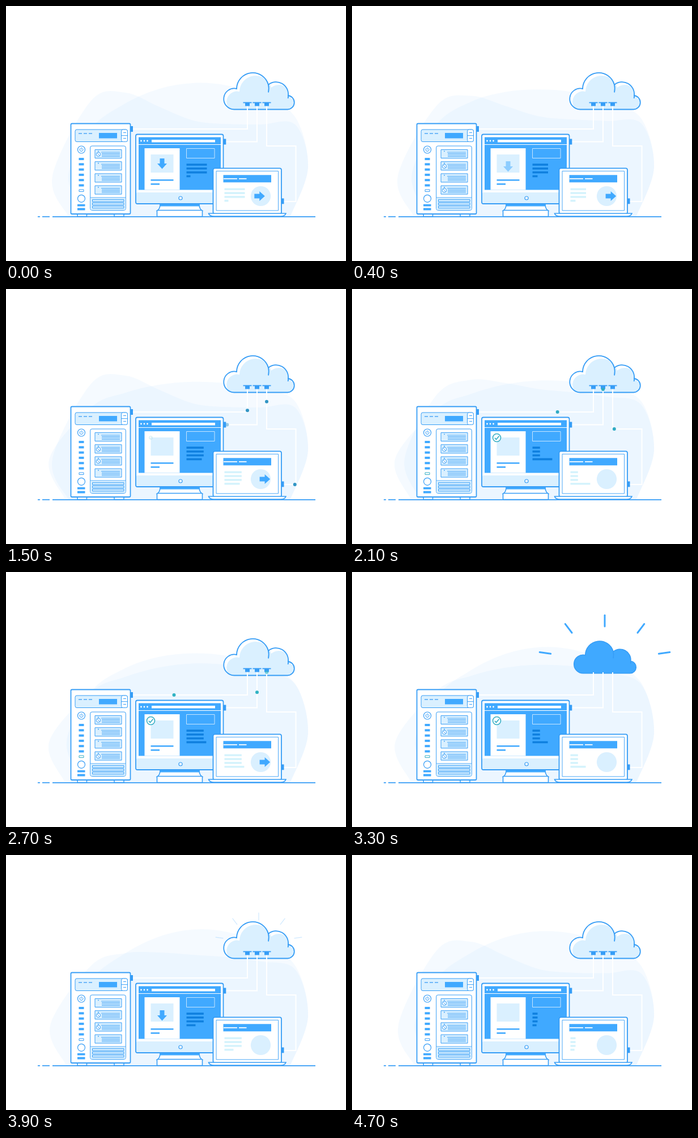
Animation, 600 px wide and 450 px high, one loop 4800 ms. Source, as an HTML page with a canvas:

```html
<!DOCTYPE html>
<html lang="en">
<head>
<meta charset="utf-8">
<title>Cloud backup</title>
<style>
html, body { margin: 0; width: 100%; height: 100%; overflow: hidden; background: #fff; }
canvas { display: block; }
</style>
</head>
<body>
<canvas id="stage" width="600" height="450"></canvas>
<script>
const g = document.getElementById('stage').getContext('2d');
const LOOP = 4800, STEP = 100, SPEED = .58, EDGE = 1.8;
const BLUE = '#40a9ff', LINE = '#369df6', PALE = '#daf0ff', DARK = '#0f80df', TEAL = '#35aec4', WHITE = '#fff';

const CABLES = [
  { pts: [[224, 217], [426, 217], [426, 177]], start: 1147, gap: 714, count: 3 },
  { pts: [[388, 239.5], [443, 239.5], [443, 177]], start: 1496, gap: 354, count: 4 },
  { pts: [[490, 345], [511.5, 345], [511.5, 247], [460, 247], [460, 177]], start: 778, gap: 344, count: 5 }
];
const CLOUD = new Path2D('M403 182.5A18.5 18.5 0 1 1 407 146A28.5 28.5 0 0 1 463 139A21.5 21.5 0 0 1 498 158A12.3 12.3 0 0 1 497 182.5Z');
const FOLDS = new Path2D('M463 139Q464.5 145 463 152.5M498 158Q498.3 161 497.5 163');

const clamp = v => Math.max(0, Math.min(1, v));
const ramp = (t, a, b) => clamp((t - a) / (b - a));
const mix = (a, b, f) => a + (b - a) * f;

function paint(path, fill, stroke, w = 1) {
  if (fill) { g.fillStyle = fill; g.fill(path); }
  if (stroke) { g.strokeStyle = stroke; g.lineWidth = w; g.stroke(path); }
}
function box(x, y, x2, y2, fill, stroke, w, r = 0) {
  const p = new Path2D();
  p.roundRect(x, y, x2 - x, y2 - y, r);
  paint(p, fill, stroke, w);
}
function disc(x, y, r, fill, stroke, w) {
  const p = new Path2D();
  p.arc(x, y, r, 0, 7);
  paint(p, fill, stroke, w);
}
const shape = (d, fill, stroke, w) => paint(new Path2D(d), fill, stroke, w);
const line = (x, y, x2, y2, color, w) => shape(`M${x} ${y}L${x2} ${y2}`, null, color, w);

function faded(alpha, draw) {
  g.save();
  g.globalAlpha = alpha;
  draw();
  g.restore();
}

// A wide dome that turns into a lump on the left around the given time
function blob(t, lumpAt, drop) {
  const gap = Math.abs(t - lumpAt), away = Math.min(gap, LOOP - gap);
  const m = 1 - Math.exp(-((away / 900) ** 2));
  const dome = x => 131 + drop + .00234 * (x - 345) ** 2 * (1 - drop / 70);
  const lump = x => 152 + 57 * (1 - Math.exp(-(((x - 200) / 90) ** 2)));
  const left = mix(82, 112 - drop * 1.2, m);
  const p = [[left + 28, 371], [left, 300]];
  for (let x = 150; x <= 510; x += 60) p.push([x, mix(lump(x), dome(x), m)]);
  p.push([533, 285], [502, 371]);

  const at = i => p[Math.max(0, Math.min(p.length - 1, i))];
  g.beginPath();
  g.moveTo(...p[0]);
  for (let i = 0; i < p.length - 1; i++) {
    const [a, b, c, d] = [at(i - 1), at(i), at(i + 1), at(i + 2)];
    g.bezierCurveTo(b[0] + (c[0] - a[0]) / 6, b[1] + (c[1] - a[1]) / 6,
      c[0] - (d[0] - b[0]) / 6, c[1] - (d[1] - b[1]) / 6, ...c);
  }
  g.fillStyle = 'rgba(56,163,253,.05)';
  g.fill();
}

// Three lines shrink every 1200 ms, the last one swells once per loop
function bars(x, y, t, color) {
  const short = 36 - 27 * ramp(t % 1200, 100, 1050);
  const last = 7 + 29 * Math.sin(Math.PI * t / LOOP) ** 2;
  for (let i = 0; i < 4; i++) {
    const cy = y + i * 6.8;
    box(x, cy - 1.8, x + (i < 3 ? short : last), cy + 1.8, color);
  }
}

function arrow(x, y, turn) {
  g.save();
  g.translate(x, y);
  g.rotate(turn);
  shape('M-9-4H0V-8.5L9.5 0L0 8.5V4H-9Z', BLUE);
  g.restore();
}

function server(t) {
  box(126, 367, 142.5, 371.5, WHITE, LINE, 1.5);
  box(191, 367, 208, 371.5, WHITE, LINE, 1.5);
  box(219, 212, 224, 222, LINE);
  box(114.5, 207.5, 219.5, 367, WHITE, LINE, EDGE, 2);

  box(122, 218, 214.5, 239.5, PALE, LINE, 1, 3);
  box(203.5, 218, 214.5, 239.5, WHITE, LINE, 1, 3);
  line(203.5, 228.7, 214.5, 228.7, LINE, 1);
  for (const y of [223.5, 233.5]) line(207, y, 212, y, LINE, 1);
  for (const x of [128, 137, 146]) line(x, 225, x + 6, 225, LINE, 1.3);
  box(164, 224, 196, 233.5, BLUE);

  disc(133, 253.5, 6.5, WHITE, LINE, 1.2);
  shape('M131 251.2A3 3 0 1 0 135 251.2M133 249.5V253.5', null, LINE, 1);
  for (let i = 0; i < 6; i++) box(128.5, 268 + i * 9.3, 137.5, 272 + i * 9.3, BLUE);
  const done = t >= 1700 && t < 3600;
  box(129, 324, 137, 327.5, WHITE, done ? TEAL : LINE, 1);
  disc(133, 339.8, 6.5, WHITE, LINE, 1.2);
  box(126, 349.8, 139.5, 353.5, BLUE);
  box(126, 356.5, 139.5, 360.5, BLUE);

  box(148.7, 247, 211.3, 360.5, WHITE, LINE, 1, 3);
  box(149.2, 338, 210.8, 360, PALE, null, 0, 3);
  line(149, 338, 211, 338, LINE, .8);
  for (let i = 0; i < 3; i++) box(152.5, 341.7 + i * 5.7, 208, 345.3 + i * 5.7, PALE, LINE, 1);

  const s = Math.floor(t / 300), e = s % 8;
  const active = [s % 3 === 0, s % 3 > 0, e > 4, e > 0 && e < 5];
  active.forEach((on, i) => drive(253.5 + i * 21.2, on));
}

function drive(y, on) {
  box(157, y, 204, y + 15, PALE, LINE, 1);
  line(168, y + 4.5, 201, y + 4.5, LINE, .9);
  for (const d of [7, 9.5, 12]) line(169, y + d, 201, y + d, LINE, .9);
  disc(163, y + 2.8, .9, LINE);
  if (!on) return;
  disc(163, y + 8.2, 3.6, WHITE, LINE, 1);
  line(161.2, y + 6.2, 164.8, y + 10.2, LINE, 1);
}

function monitor(t) {
  box(384, 234.5, 388.3, 244.5, LINE);
  shape('M272 350H341Q341 358 346 361H267Q272 358 272 350Z', WHITE, LINE, 1.5);
  box(272, 350, 341, 353.5, BLUE);
  box(266.5, 360.5, 346.5, 371.5, WHITE, LINE, 1.6, 1);
  box(229, 226.5, 383.5, 349, WHITE, LINE, EDGE, 3);
  box(230, 329, 382.5, 348, PALE, null, 0, 2);
  disc(308, 339, 3, WHITE, LINE, 1.2);

  box(234, 231.5, 379, 324.5, BLUE);
  for (const x of [238.5, 244, 249.5]) disc(x, 238, 1.4, WHITE);
  box(257, 236, 369, 240.5, WHITE);
  line(234, 244.5, 379, 244.5, WHITE, 1);
  box(244.5, 251, 306.5, 324.5, WHITE);
  box(318.5, 251.5, 368, 268.5, null, '#d5ecff', .9);
  bars(318.5, 280, t, DARK);
  box(255.5, 262, 295.5, 294, PALE);
  line(255.5, 307.3, 295.5, 307.3, BLUE, 2.6);
  line(255.5, 314.3, 271, 314.3, BLUE, 2.6);

  const ph = t % 600;
  if (t < 1300 || t >= 3700)
    faded(1 - ramp(ph, 300, 500), () => arrow(275.5, 278 + 5 * ramp(ph, 0, 300), Math.PI / 2));

  const k = ramp(t, 1380, 1680) * (1 - ramp(t, 3500, 3700));
  faded(k, () => {
    g.translate(255.5, 262.5);
    g.scale(k, k);
    disc(0, 0, 7, WHITE, TEAL, 1.6);
    shape('M-3.5 .3L-1 3L4-3', null, TEAL, 1.7);
  });
}

function laptop(t) {
  box(486, 339.5, 490.5, 349.3, LINE);
  box(365.5, 286.3, 486, 367, WHITE, LINE, EDGE, 3);
  box(371, 291.3, 480.5, 361, WHITE, LINE, .9);
  shape('M357.5 366H494Q492 371 485 371H367Q359 371 357.5 366Z', WHITE, LINE, 1.6);
  box(383.5, 298.3, 468, 311.3, BLUE);
  line(384, 304.8, 408, 304.8, WHITE, 1.8);
  line(411, 304.8, 424.5, 304.8, WHITE, 1.8);
  bars(385.5, 323.3, t, '#d5f3fc');
  disc(449.5, 335.5, 17.6, PALE);
  const ph = t % 1200;
  if (t < 2900)
    faded(1 - ramp(ph, 400, 600), () => arrow(447.3 + 9.3 * ramp(ph, 0, 300), 335.5, 0));
}

function cloud(t) {
  const ph = t < 3050 || t >= 4650 ? -1 : (t - 3050) % 800;
  const solid = ramp(ph, 60, 200) * (1 - ramp(ph, 380, 560));
  g.save();
  g.translate(446.5, 151.5);
  g.scale(1 - .12 * solid, 1 - .12 * solid);
  g.translate(-446.5, -151.5);
  paint(CLOUD, WHITE);
  g.save();
  g.clip(CLOUD);
  g.translate(5, 5);
  paint(CLOUD, PALE);
  g.restore();
  faded(solid, () => paint(CLOUD, BLUE));
  paint(CLOUD, null, LINE, EDGE);
  paint(FOLDS, null, LINE, EDGE);
  g.restore();

  faded(1 - solid, () => {
    for (const x of [426, 443, 460]) {
      line(x - 7.5, 170.5, x + 7.5, 170.5, LINE, 1.8);
      box(x - 4, 171, x + 4, 176.5, LINE);
    }
  });
  if (ph >= 0) rays(ph);
}

function rays(ph) {
  const s = .54 + .63 * (1 - (1 - ramp(ph, 0, 550)) ** 2), grow = ramp(ph, 0, 200);
  faded(grow * (1 - ramp(ph, 500, 650)), () => {
    g.lineCap = 'round';
    for (const deg of [8, 53, 90, 127, 172]) {
      const x = s * Math.cos(deg * Math.PI / 180), y = s * Math.sin(deg * Math.PI / 180);
      line(446 + x * 118, 152 - y * 77, 446 + x * 98, 152 - y * 57, BLUE, mix(.6, 3, grow));
    }
  });
}

function along(pts, d) {
  for (let i = 1; i < pts.length; i++) {
    const [x, y] = pts[i - 1], [u, v] = pts[i], len = Math.hypot(u - x, v - y);
    if (d <= len) return [mix(x, u, d / len), mix(y, v, d / len)];
    d -= len;
  }
  return pts[pts.length - 1];
}

function packets({ pts, start, gap, count }, t) {
  const total = pts.slice(1).reduce((s, [x, y], i) => s + Math.hypot(x - pts[i][0], y - pts[i][1]), 0);
  const color = `hsl(${mix(208, 187, ramp(t, 900, 2300))} 60% 48%)`;
  for (let i = 0; i < count; i++) {
    const d = (t - start - i * gap) * SPEED;
    if (d <= 0) continue;
    const alpha = clamp(d / 5) * (1 - ramp(d, total + 70, total + 85));
    faded(alpha, () => disc(...along(pts, d), 3, color));
  }
}

function draw(t) {
  g.clearRect(0, 0, 600, 450);
  blob(t, 1500, 0);
  blob(t, 0, 30);
  cloud(t);
  for (const c of CABLES) shape('M' + c.pts.join('L'), null, WHITE, 2);
  for (const c of CABLES) packets(c, t);
  server(t);
  monitor(t);
  laptop(t);
  for (const [a, b] of [[56, 60], [64, 77], [82, 546]]) line(a, 371.8, b, 371.8, LINE, 1.7);
}

const begin = performance.now();
function tick() {
  const t = (performance.now() - begin) % LOOP;
  draw(Math.floor(t / STEP) * STEP);
  requestAnimationFrame(tick);
}
tick();
</script>
</body>
</html>
```
